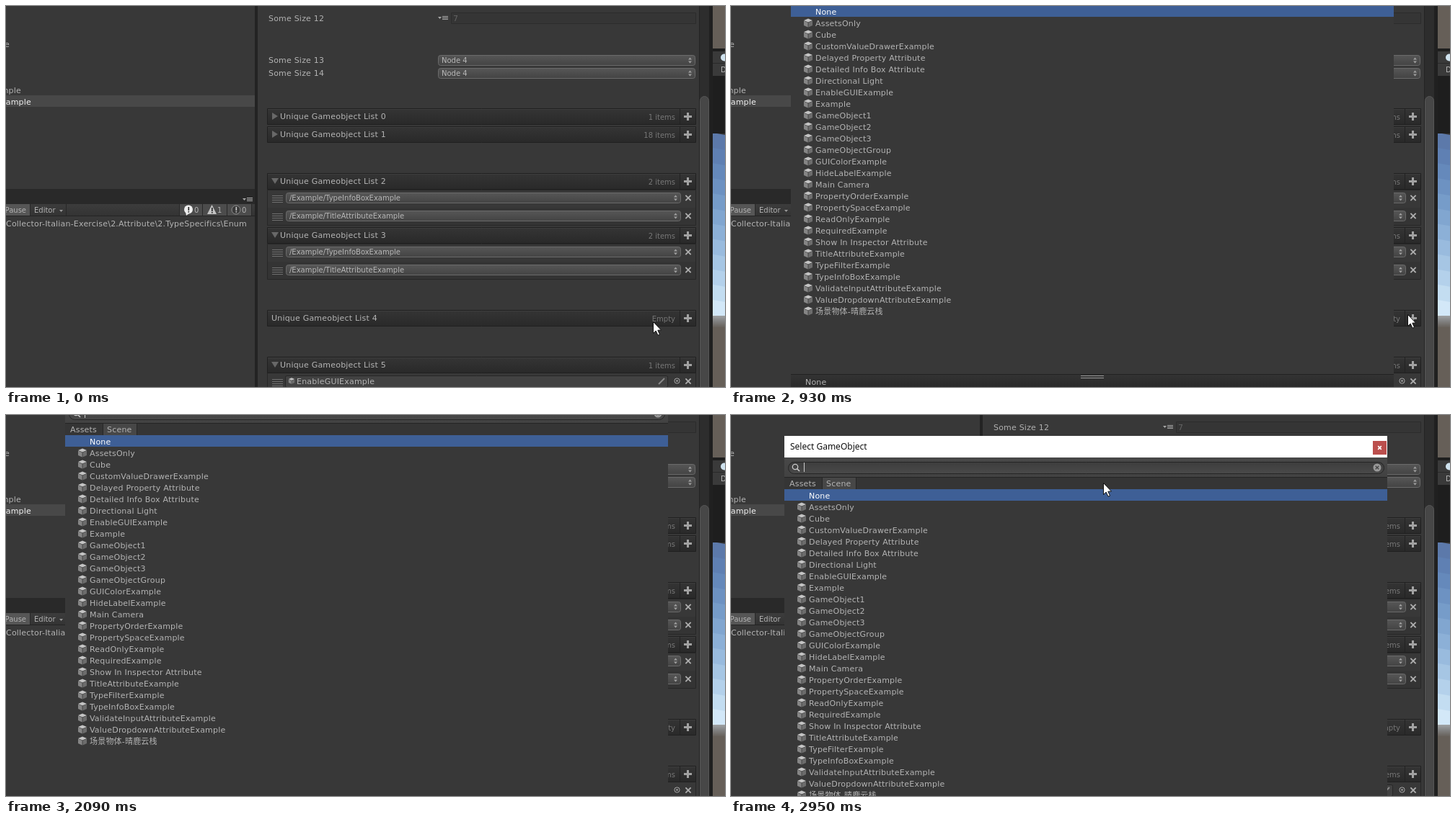
Animation of 997 by 529 pixels, one loop 3730 ms. Source, as an HTML page with a canvas:

```html
<!DOCTYPE html>
<html lang="en">
<head>
<meta charset="utf-8">
<title>Object picker</title>
<style>
html, body { margin: 0; width: 100%; height: 100%; overflow: hidden; background: #383838; }
canvas { display: block; }
</style>
</head>
<body>
<canvas id="stage" width="997" height="529"></canvas>
<script>
const c = document.getElementById('stage').getContext('2d');
const LOOP = 3730, TEXT = '#b4b4b4';
const UI = '"DejaVu Sans", "Noto Sans CJK SC", "Noto Sans CJK", sans-serif';

// Held positions: [time, x, y]
const pointerKeys = [
  [0, 897, 438], [70, 900, 437], [150, 912, 434], [230, 926, 430], [300, 935, 428], [380, 938, 428],
  [1160, 905, 392], [1240, 735, 210], [1310, 547, 31], [1390, 532, -57],
  [2630, 523, 47], [2780, 522, 54], [2860, 518, 82], [2950, 516, 94]
];
const windowKeys = [[930, 83, -1], [2020, 82, 28], [2100, 79, 59], [2170, 76, 84], [2250, 75, 97], [2320, 74, 103]];
const objects = ['None', 'AssetsOnly', 'Cube', 'CustomValueDrawerExample', 'Delayed Property Attribute',
  'Detailed Info Box Attribute', 'Directional Light', 'EnableGUIExample', 'Example', 'GameObject1',
  'GameObject2', 'GameObject3', 'GameObjectGroup', 'GUIColorExample', 'HideLabelExample', 'Main Camera',
  'PropertyOrderExample', 'PropertySpaceExample', 'ReadOnlyExample', 'RequiredExample',
  'Show In Inspector Attribute', 'TitleAttributeExample', 'TypeFilterExample', 'TypeInfoBoxExample',
  'ValidateInputAttributeExample', 'ValueDropdownAttributeExample', '场景物体-晴鹿云栈'];

const held = (keys, t) => keys.filter(k => k[0] <= t).pop();

function rect(x, y, w, h, fill) {
  c.fillStyle = fill;
  c.fillRect(x, y, w, h);
}

function fade(y, h, ...colors) {
  const g = c.createLinearGradient(0, y, 0, y + h);
  colors.forEach((color, i) => g.addColorStop(i / (colors.length - 1), color));
  return g;
}

function pill(x, y, w, h, r, fill, stroke) {
  c.beginPath();
  c.roundRect(x + .5, y + .5, w - 1, h - 1, r);
  c.fillStyle = fill;
  c.fill();
  c.lineWidth = 1;
  c.strokeStyle = stroke;
  c.stroke();
}

// y is the middle of the line
function text(s, x, y, color = TEXT, size = 11, align = 'left', font = UI) {
  c.font = `${size}px ${font}`;
  c.letterSpacing = size === 11 ? '.2px' : '0px';
  c.textAlign = align;
  c.fillStyle = color;
  c.fillText(s, x, y + 4);
}

function poly(points, fill) {
  c.beginPath();
  points.forEach(([x, y]) => c.lineTo(x, y));
  c.closePath();
  c.fillStyle = fill;
  c.fill();
}

function line(x1, y1, x2, y2, color, width = 1) {
  c.beginPath();
  c.moveTo(x1, y1);
  c.lineTo(x2, y2);
  c.lineWidth = width;
  c.strokeStyle = color;
  c.stroke();
}

function disc(x, y, r, fill) {
  c.beginPath();
  c.arc(x, y, r, 0, 7);
  c.fillStyle = fill;
  c.fill();
}

function ring(x, y, r, color, width = 1) {
  c.beginPath();
  c.arc(x, y, r, 0, 7);
  c.lineWidth = width;
  c.strokeStyle = color;
  c.stroke();
}

function cross(x, y, r, color, width) {
  line(x - r, y - r, x + r, y + r, color, width);
  line(x - r, y + r, x + r, y - r, color, width);
}

function menuIcon(x, y) {
  poly([[x, y - 1.5], [x + 5, y - 1.5], [x + 2.5, y + 1.5]], '#a8a8a8');
  for (let i = -1; i < 2; i++) rect(x + 6, y + i * 2 - .5, 8, 1, '#a8a8a8');
}

function cube(x, y, s = 1) {
  const at = (...pts) => pts.map(([px, py]) => [x + px * s, y + py * s]);
  poly(at([0, -6], [6, -3.5], [0, -1], [-6, -3.5]), '#c4c4c4');
  poly(at([-6, -3], [-.4, -.5], [-.4, 6], [-6, 3.5]), '#858585');
  poly(at([6, -3], [.4, -.5], [.4, 6], [6, 3.5]), '#6c6c6c');
}

function dropdown(label, x, y, w) {
  pill(x, y, w, 15, 3, fade(y, 15, '#575757', '#434343'), '#6a6a6a');
  text(label, x + 5, y + 7, '#b8b8b8', 10);
  const a = x + w - 7.5;
  poly([[a - 2.5, y + 6.5], [a + 2.5, y + 6.5], [a, y + 3.5]], '#a0a0a0');
  poly([[a - 2.5, y + 8.5], [a + 2.5, y + 8.5], [a, y + 11.5]], '#a0a0a0');
}

function listHeader(n, y, count, arrow, pressed) {
  pill(362, y, 595, 23, 0, fade(y, 23, '#353535', '#292929'), '#202020');
  rect(363, y + 1, 593, 1, '#3d3d3d');
  if (pressed) rect(935, y + 1, 21, 21, '#1c1c1c');
  rect(934, y + 1, 1, 21, '#222');
  if (arrow === 'open') poly([[368, y + 7], [378, y + 7], [373, y + 15]], '#686868');
  if (arrow === 'shut') poly([[369, y + 6], [377, y + 11], [369, y + 16]], '#686868');
  text('Unique Gameobject List ' + n, arrow ? 380 : 368, y + 11);
  text(count, 928, y + 12, '#777', 10, 'right');
  rect(940, y + 10, 11, 3, '#a2a2a2');
  rect(944, y + 6, 3, 11, '#a2a2a2');
}

function handle(y) {
  for (let i = 0; i < 4; i++) rect(369, y + i * 3, 15, 1, '#707070');
}

function listRows(y) {
  pill(362, y, 595, 50, 0, '#383838', '#272727');
  rect(363, y + 25, 593, 24, '#343434');
  ['TypeInfoBoxExample', 'TitleAttributeExample'].forEach((name, i) => {
    const top = y + i * 25;
    handle(top + 8);
    dropdown('/Example/' + name, 388, top + 4, 548);
    cross(946, top + 11.5, 3.6, '#b0b0b0', 1.8);
  });
}

function leftPanel() {
  rect(0, 124, 345, 16, '#484848');
  text('Example', 5, 53, TEXT, 11, 'right');
  text('Example', 21, 117, TEXT, 11, 'right');
  text('Example', 35, 133, '#f2f2f2', 11, 'right');
  rect(0, 254, 345, 21, '#292929');
  menuIcon(328, 268.5);
  rect(0, 275, 345, 17, fade(275, 17, '#3c3c3c', '#333'));
  rect(0, 275, 33, 16, '#565656');
  rect(241, 275, 99, 16, '#4c4c4c');
  rect(0, 291, 345, 1, '#242424');
  [33, 83, 240, 272, 306, 340].forEach(x => rect(x, 275, 1, 16, '#282828'));
  text('Pause', 28, 283, TEXT, 10, 'right');
  text('Editor', 39, 283, TEXT, 10);
  poly([[74, 283], [79, 283], [76.5, 286]], '#999');
  disc(253, 282.5, 6, '#eee');
  poly([[249, 286], [255, 287], [250, 291]], '#eee');
  poly([[285.5, 276], [292, 289], [279, 289]], '#c4c4c4');
  disc(319, 283, 6, '#3a3a3a');
  ring(319, 283, 6, '#8f8f8f');
  [[252.5, 279, '#222'], [285, 280, '#222'], [318.5, 279, '#ccc']].forEach(([x, y, color]) => {
    rect(x, y, 1.6, 5, color);
    rect(x, y + 6, 1.6, 1.6, color);
  });
  ['0', '1', '0'].forEach((n, i) => text(n, [261, 293, 327][i], 283, TEXT, 10));
  c.save();
  c.beginPath();
  c.rect(0, 292, 344, 30);
  c.clip();
  text('Collector-Italian-Exercise\\2.Attribute\\2.TypeSpecifics\\Enum', 0, 302);
  c.restore();
}

function rightEdge() {
  rect(961, 0, 15, 529, '#2d2d2d');
  rect(961, 0, 1, 529, '#242424');
  pill(962, 125, 13, 420, 6, '#474747', '#575757');
  rect(975, 0, 5, 529, '#202020');
  rect(980, 0, 17, 59, '#665f58');
  rect(980, 59, 17, 4, '#1e1e1e');
  rect(980, 63, 17, 34, '#3a3a3a');
  rect(980, 79, 17, 1, '#292929');
  disc(996, 71.5, 5, '#cfe2ee');
  text('D', 991, 88, TEXT, 10);
  rect(980, 97, 17, 80, '#1e1e1e');
  // The sky falls in slightly tilted bands
  c.save();
  c.beginPath();
  c.rect(980, 177, 17, 253);
  c.clip();
  const bands = 12, step = 253 / bands;
  for (let i = 0; i <= bands; i++) {
    const k = i / bands, mix = (a, b, p) => a + (b - a) * k ** p;
    const y = 177 + i * step;
    poly([[980, y - 1], [997, y + 2], [997, 430], [980, 430]],
      `rgb(${mix(92, 228, 1.5)}, ${mix(121, 244, 1.15)}, ${mix(170, 254, .9)})`);
  }
  c.restore();
  rect(980, 430, 17, 99, '#665f58');
  rect(980, 430, 17, 16, fade(430, 16, '#a0a2a4', '#808080', '#68625c'));
}

function inspector(pressed) {
  rect(345, 0, 4, 529, '#232323');
  text('Some Size 12', 364, 17, '#b0b0b0');
  menuIcon(599, 16.5);
  pill(617, 9, 340, 16, 0, '#353535', '#2c2c2c');
  text('7', 620, 17, '#646464');
  [13, 14].forEach((n, i) => {
    text('Some Size ' + n, 364, 75 + i * 18);
    dropdown('Node 4', 599, 68 + i * 18, 357);
  });
  listHeader(0, 142, '1 items', 'shut');
  listHeader(1, 167, '18 items', 'shut');
  [2, 3].forEach((n, i) => {
    listRows(255 + i * 75);
    listHeader(n, 232 + i * 75, '2 items', 'open');
  });
  listHeader(4, 422, 'Empty', '', pressed);
  pill(362, 509, 595, 40, 0, '#383838', '#272727');
  listHeader(5, 487, '1 items', 'open');
  handle(518);
  pill(387, 513, 531, 17, 2, '#424242', '#262626');
  cube(396, 520.5, .7);
  text('EnableGUIExample', 403, 521);
  line(905, 525, 913, 517, '#8a8a8a', 2);
  ring(930.5, 520.5, 3.6, '#aaa');
  disc(930.5, 520.5, 1.3, '#aaa');
  cross(946, 521, 3.6, '#b0b0b0', 1.8);
}

// y is the top of the first row
function picker(x, y) {
  const w = 836;
  rect(x, y - 74, w, 640, '#383838');
  rect(x, y - 74, w, 30, '#fff');
  text('Select GameObject', x + 8, y - 59, '#111', 12, 'left', '"Noto Sans", "Open Sans", sans-serif');
  rect(x + 816, y - 67, 19, 19, '#bb4f4d');
  cross(x + 825.5, y - 57.5, 2.3, '#fff', 1.7);
  rect(x, y - 44, w, 27, fade(y - 44, 27, '#484848', '#424242'));
  pill(x + 5, y - 38, 827, 17, 8, fade(y - 38, 17, '#3d3d3d', '#4a4a4a'), '#252525');
  ring(x + 15, y - 31, 3.7, '#ccc', 1.3);
  line(x + 17.5, y - 28.5, x + 21, y - 25, '#ccc', 1.6);
  rect(x + 27, y - 37, 1, 13, '#ccc');
  disc(x + 822, y - 30, 5.5, '#999');
  cross(x + 822, y - 30, 2.3, '#444', 1.3);
  rect(x, y - 17, w, 17, '#353535');
  rect(x, y - 17, w, 1, '#252525');
  rect(x + 52, y - 16, 47, 16, '#474747');
  rect(x + 52, y - 16, 1, 16, '#272727');
  rect(x + 99, y - 16, 1, 16, '#272727');
  text('Assets', x + 7, y - 8);
  text('Scene', x + 58, y - 8);
  rect(x, y, w, 16, '#3e5f96');
  objects.forEach((name, i) => {
    const mid = y + 9 + i * 16;
    text(name, x + 34, mid, i ? TEXT : '#fff');
    if (i) cube(x + 24, mid - .5);
  });
  rect(x, y + 512, w, 1, '#222');
  rect(x, y + 513, w, 60, fade(y + 513, 18, '#333', '#2a2a2a'));
  rect(x + 402, y + 514, 32, 1, '#999');
  rect(x + 402, y + 517, 32, 1, '#999');
  text('None', x + 20, y + 523);
}

function pointer(x, y, down) {
  if (down) disc(x, y, 12, '#fbe94bee');
  c.beginPath();
  [[0, 0], [0, 16], [3.7, 12.6], [6.5, 18.7], [9, 17.6], [6.3, 11.7], [11, 11.5]]
    .forEach(([dx, dy]) => c.lineTo(x + .5 + dx, y + .5 + dy));
  c.closePath();
  c.fillStyle = '#fff';
  c.fill();
  c.lineWidth = 1;
  c.strokeStyle = '#111';
  c.stroke();
}

function draw(now) {
  const t = now % LOOP;
  rect(0, 0, 997, 529, '#383838');
  leftPanel();
  inspector(t >= 780 && t < 930);
  rightEdge();
  const win = held(windowKeys, t);
  if (win) picker(win[1], win[2]);
  const dragging = t >= 2020 && t < 2630;
  let [, x, y] = held(pointerKeys, t);
  if (dragging) [x, y] = [win[1] + 449, win[2] - 56];
  pointer(x, y, dragging || (t >= 780 && t < 850));
}

const start = performance.now();
(function tick() {
  draw(performance.now() - start);
  requestAnimationFrame(tick);
})();
</script>
</body>
</html>
```
